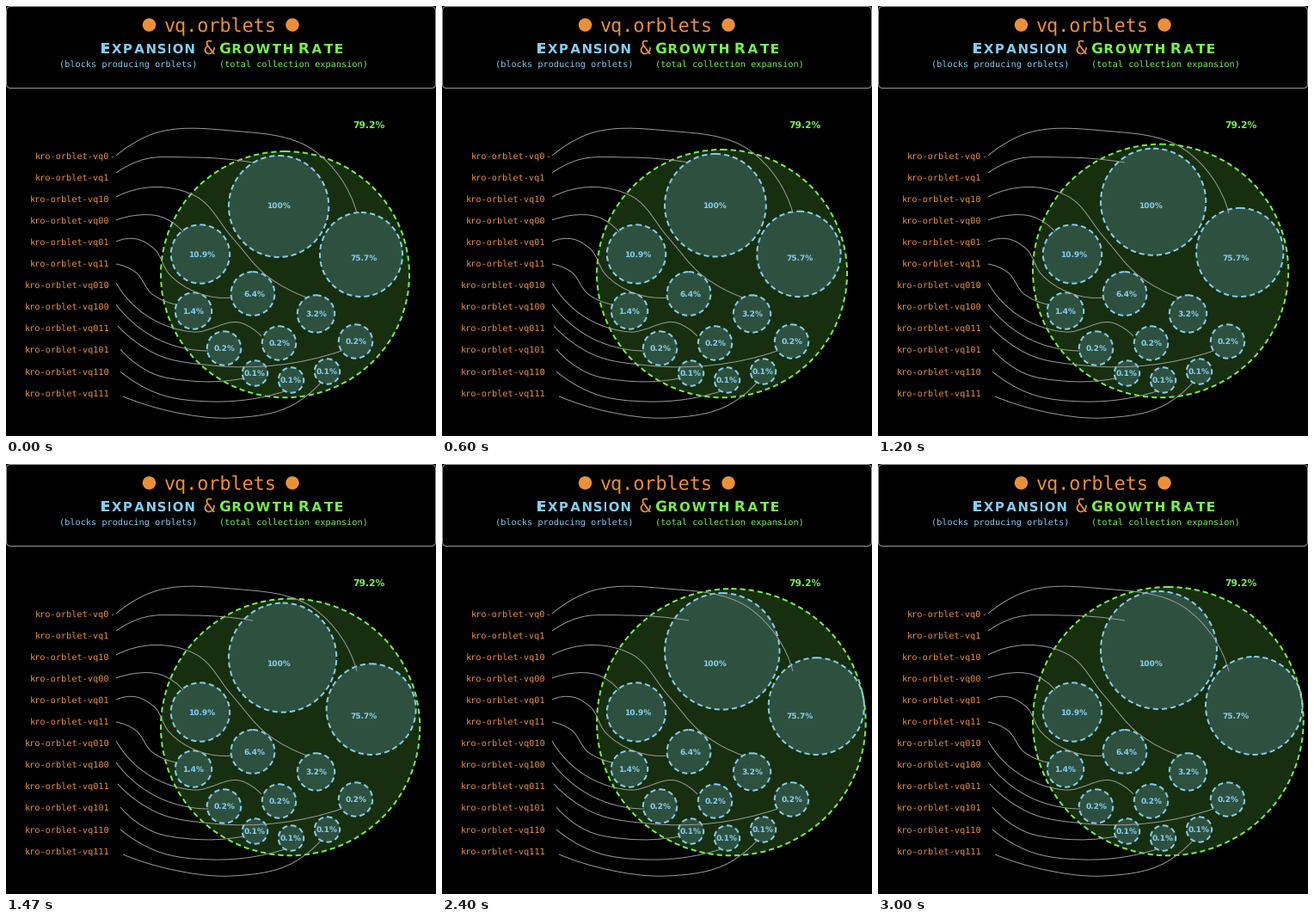
A matplotlib script for the animation above (4.73 s loop, 500 by 500 pixels).

```python
import numpy as np
import matplotlib.pyplot as plt
from matplotlib.animation import FuncAnimation
from matplotlib.patches import Circle, Ellipse, FancyBboxPatch, PathPatch
from matplotlib.path import Path
from matplotlib.textpath import TextPath
from matplotlib.transforms import Affine2D

SIZE = 500
PT = 0.72                 # points per pixel at 100 dpi
LOOP, TICK = 4730, 22     # ms
STEP, STEPS = 200 / 3, 45

ORANGE, BLUE, GREEN, GRAY = "#ec9038", "#84cdf0", "#78f04a", "#999999"
MONO, SANS = "DejaVu Sans Mono", "DejaVu Sans"

plt.rcParams["text.hinting"] = "none"
fig = plt.figure(figsize=(5, 5), dpi=100, facecolor="black")
ax = fig.add_axes([0, 0, 1, 1])
ax.set_xlim(0, SIZE)
ax.set_ylim(SIZE, 0)
ax.axis("off")


def text(x, y, s, px, color, family=MONO, ha="center", weight="normal"):
    ax.text(x, y, s, fontsize=px * PT, color=color, family=family,
            ha=ha, va="baseline", weight=weight)


def percent(x, y, s, px=9, color=BLUE):
    text(x, y + px * 0.36, s, px, color, SANS, weight="bold")


def small_caps(cx, y, s, color, big=16.8, small=15, gap=3.1, space=5.5):
    """Centred line in capitals, lower case letters set smaller."""
    x, glyphs = 0, []
    for ch in s:
        if ch == " ":
            x += space
            continue
        path = TextPath((0, 0), ch.upper(), size=big if ch.isupper() else small,
                        prop={"family": SANS, "weight": "bold"})
        box = path.get_extents()
        glyphs.append((path, x - box.x0))
        x += box.width + gap
    left = cx - (x - gap) / 2
    for path, dx in glyphs:
        place = Affine2D().scale(1, -1).translate(left + dx, y)
        ax.add_patch(PathPatch(place.transform_path(path), fc=color, lw=0))


def bubble(color, alpha, box, z=2):
    """Filled ellipse with a dashed rim; returns both parts."""
    fill = Ellipse((0, 0), 1, 1, fc=color, alpha=alpha, lw=0, zorder=z)
    rim = Ellipse((0, 0), 1, 1, fill=False, ec=color, lw=2 * PT,
                  ls=(0, (3.1, 2)), zorder=z)
    parts = fill, rim
    for part in parts:
        ax.add_patch(part)
    fit(parts, box)
    return parts


def fit(parts, box):
    left, top, right, bottom = box
    for part in parts:
        part.set_center(((left + right) / 2, (top + bottom) / 2))
        part.set_width(right - left)
        part.set_height(bottom - top)


def spline(pts):
    """Smooth path through the points, bending like an arc at both ends."""
    p = np.array(pts, float)
    d = np.diff(p, axis=0)
    length = np.hypot(d[:, 0], d[:, 1])[:, None]
    u = d / length
    t = u[:-1] * length[1:] + u[1:] * length[:-1]
    t /= np.hypot(t[:, 0], t[:, 1])[:, None]
    t = np.vstack([2 * (u[0] @ t[0]) * u[0] - t[0], t,
                   2 * (u[-1] @ t[-1]) * u[-1] - t[-1]])
    verts = [p[0]]
    for a, b, ta, tb, n in zip(p, p[1:], t, t[1:], length):
        verts += [a + ta * n / 3, b - tb * n / 3, b]
    return Path(verts, [Path.MOVETO] + [Path.CURVE4] * (len(verts) - 1))


# Header
ax.add_patch(FancyBboxPatch((5.5, 5.5), 489, 85, fc="black", ec=GRAY, lw=PT,
                            boxstyle="round,pad=5,rounding_size=5"))
for x in (166.5, 333):
    ax.add_patch(Circle((x, 22), 7.7, fc=ORANGE, lw=0))
text(249.5, 30.5, "vq.orblets", 21.8, ORANGE)
small_caps(165, 55, "Expansion", BLUE)
small_caps(320, 55, "Growth Rate", GREEN)
text(236, 56, "&", 22, ORANGE)
text(142.5, 71, "(blocks producing orblets)", 10.2, BLUE)
text(334, 71, "(total collection expansion)", 10.2, GREEN)

# Key points of the leader line behind each label, from top to bottom
leaders = {
    "0": [(128, 174), (165, 151), (262, 145), (358, 168), (408, 241)],
    "1": [(128, 194), (155, 180), (215, 176), (287, 182)],
    "10": [(128, 222), (172, 210.5), (222, 222), (262, 268), (305, 315), (350, 339)],
    "00": [(128, 249), (150, 243.5), (180, 245), (206, 263)],
    "01": [(128, 274), (152, 271), (172, 282), (190, 312), (263, 339)],
    "11": [(128, 300), (150, 309), (170, 335), (198, 347)],
    "010": [(128, 322), (165, 361), (218, 379), (275, 369), (297, 384)],
    "100": [(128, 347), (170, 384), (235, 401)],
    "011": [(130, 372), (175, 405), (240, 418), (390, 401)],
    "101": [(133, 399), (170, 427), (215, 436), (276, 433)],
    "110": [(133, 425), (175, 450), (240, 460), (324, 448)],
    "111": [(136, 454), (190, 471), (262, 479), (335, 463), (366, 438)],
}
for i, (suffix, pts) in enumerate(leaders.items()):
    text(120.5, 177.5 + 25.1 * i, "kro-orblet-vq" + suffix, 10.3, ORANGE, ha="right")
    ax.add_patch(PathPatch(spline(pts), fill=False, ec=GRAY, lw=PT, zorder=3))
text(126.5, 177.5, "-", 10.3, ORANGE, ha="right")

# Bubbles that stay: centre, radius, share
for cx, cy, r, share in [
        (226, 288.5, 34.2, 10.9), (287, 334.5, 25.4, 6.4), (218, 354.5, 21.2, 1.4),
        (360.5, 358, 21.7, 3.2), (253.5, 398, 19.7, 0.2), (317.5, 392, 19.7, 0.2),
        (406.5, 390, 19.7, 0.2), (289.5, 427, 14.7, 0.1), (331.5, 435, 14.7, 0.1),
        (373.5, 425, 14.7, 0.1)]:
    bubble(BLUE, 0.22, (cx - r, cy - r, cx + r, cy + r))
    percent(cx + share / 4, cy, f"{share}%")

percent(317.5, 232, "100%")
percent(416.5, 292.5, "75.7%")
percent(421.5, 137.7, "79.2%", 10.7, GREEN)

# Bubbles that grow: colour, opacity, first and last box
growing = [
    (bubble(color, alpha, first, z), np.array(first), np.array(last))
    for color, alpha, z, first, last in [
        (GREEN, 0.2, 1, (180, 169, 469, 455.3), (180, 143, 494.7, 455.3)),
        (BLUE, 0.22, 2, (259, 174, 375.3, 292), (259, 148, 394, 285)),
        (BLUE, 0.22, 2, (365, 240, 461, 338), (381, 224, 493.5, 338)),
    ]
]


def ease(t):
    return 2 * t * t if t < 0.5 else 1 - 2 * (1 - t) ** 2


def draw(i):
    step = min(STEPS, int((i + 1) * TICK / STEP))
    k = ease(step / STEPS)
    for parts, first, last in growing:
        fit(parts, first + (last - first) * k)
    return [part for parts, _, _ in growing for part in parts]


ani = FuncAnimation(fig, draw, frames=LOOP // TICK, interval=TICK,
                    init_func=lambda: draw(0), repeat=True, repeat_delay=0)
plt.show()
```
